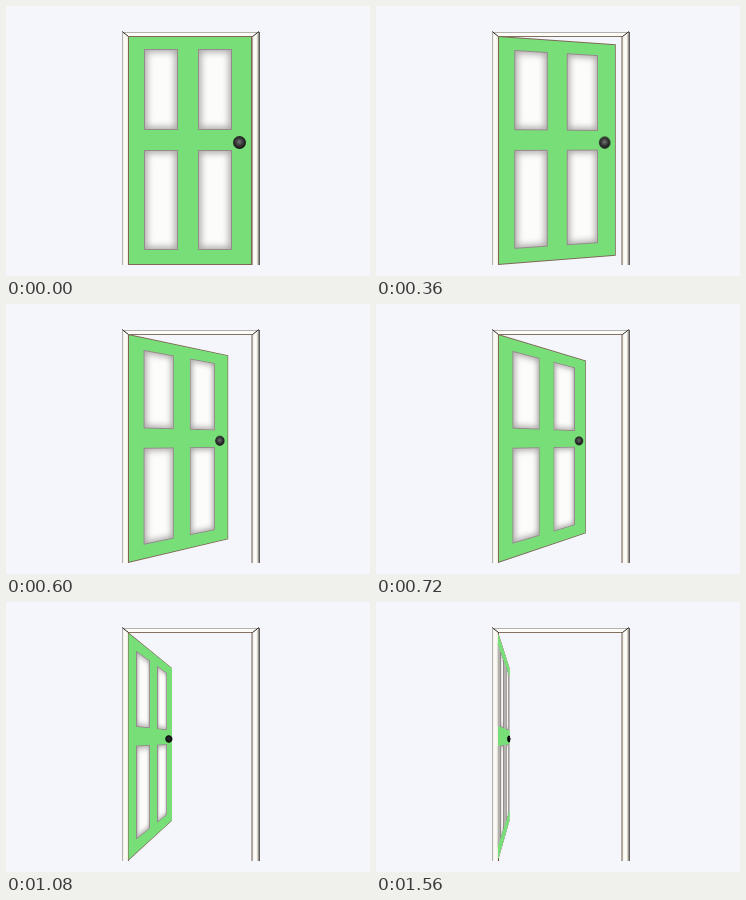
Write an HTML page without scripts that moves like this. It is 364x270 px and loops after 2.22 s.

```html
<!DOCTYPE html>
<html lang="en">
<head>
<meta charset="utf-8">
<title>Opening door</title>
<style>
  html, body {
    margin: 0;
    width: 100%;
    height: 100%;
    overflow: hidden;
    background: #f4f6fb;
  }

  .stage {
    position: relative;
    width: 364px;
    height: 270px;
    overflow: hidden;
    perspective: 239px;
    perspective-origin: 184px 138px;
  }

  .frame { position: absolute; inset: 0; }

  .door, .panel, .knob {
    position: absolute;
    box-sizing: border-box;
    animation: 2220ms infinite;
  }

  .door {
    left: 122px;
    top: 30px;
    width: 123.5px;
    height: 229px;
    background: #78de78;
    border: 1px solid #7d6656;
    transform-origin: 0 50%;
    animation-name: swing;
    animation-timing-function: steps(2);
  }

  .panel {
    --edge: #a5a3a0;
    width: 34px;
    background: #fcfdfb;
    border: 1px solid #94898b;
    animation-name: flatten;
    animation-timing-function: steps(4);
  }
  .left { left: 15px; }
  .right { left: 69px; }
  .upper { top: 12px; height: 81px; }
  .lower { top: 113px; height: 100px; }

  .knob {
    left: 104px;
    top: 99px;
    width: 13px;
    height: 13px;
    border-radius: 50%;
    background: radial-gradient(circle at 48% 45%, #777 0, #444 30%, #1c1c1c 62%, #000);
    animation-name: bulge;
    animation-timing-function: steps(4);
  }

  /* One pose every 120 ms, each split in two held steps. */
  @keyframes swing {
    0%      { transform: rotateY(0deg); }
    5.405%  { transform: rotateY(.8deg); }
    10.811% { transform: rotateY(2.7deg); }
    16.216% { transform: rotateY(9.2deg); }
    21.622% { transform: rotateY(17.5deg); }
    27.027% { transform: rotateY(28deg); }
    32.432% { transform: rotateY(39deg); }
    37.838% { transform: rotateY(51deg); }
    43.243% { transform: rotateY(63deg); }
    48.649% { transform: rotateY(73.6deg); }
    54.054% { transform: rotateY(83.5deg); }
    59.459% { transform: rotateY(90.8deg); }
    64.865% { transform: rotateY(94.5deg); }
    70.27%, 100% { transform: rotateY(96.5deg); }
  }

  /* Panel edges keep their visible weight as the door turns edge-on. */
  @keyframes flatten {
    0%, 32.432% {
      border-inline-width: 1px;
      box-shadow: inset 0 0 7px 2px #aaa5a6, 0 0 var(--edge), 0 0 var(--edge);
    }
    48.649% {
      border-inline-width: 2px;
      box-shadow: inset 0 0 7px 2px #aaa5a6, 0 0 var(--edge), 0 0 var(--edge);
    }
    59.459% {
      border-inline-width: 6px;
      box-shadow: inset 0 0 10px 8px #b8b4b6, 4px 0 var(--edge), -4px 0 var(--edge);
    }
    70.27%, 100% {
      border-inline-width: 8px;
      box-shadow: inset 0 0 6px 2px #c4c1c0, 18px 0 #b4b2ae, -18px 0 #b4b2ae;
    }
  }

  /* The knob stands out from the door, so it narrows less than the door does. */
  @keyframes bulge {
    0%, 21.622% { transform: scale(1); filter: brightness(1); }
    32.432% { transform: scale(1.15, .9); filter: brightness(.9); }
    48.649% { transform: scale(2.2, .85); filter: brightness(.4); }
    59.459% { transform: scale(3.3, .8); filter: brightness(.2); }
    70.27%, 100% { transform: scale(4, .75); filter: brightness(.2); }
  }
</style>
</head>
<body>
<div class="stage">
  <svg class="frame" width="364" height="270" viewBox="0 0 364 270">
    <defs>
      <linearGradient id="post">
        <stop offset="0" stop-color="#ece9e2"/>
        <stop offset=".45" stop-color="#fffffd"/>
        <stop offset="1" stop-color="#ece8de"/>
      </linearGradient>
    </defs>
    <path d="M116.5 26L122.5 30.5V259H116.5Z" fill="url(#post)"/>
    <path d="M253 26L246 30.5V259H253Z" fill="url(#post)"/>
    <path d="M116 26.5H253L246.5 30.5H122Z" fill="#fdfcf8"/>
    <g fill="none">
      <path d="M116.5 27V259M117 26.5H253" stroke="#b5b1ac"/>
      <path d="M122 30.5H246.5" stroke="#85715f"/>
      <path d="M122.5 30V259" stroke="#51443c"/>
      <path d="M246 30V259" stroke="#6e5c50"/>
      <path d="M252 28V259" stroke="#b5aea4"/>
      <path d="M253.2 26V259" stroke="#1d1a18"/>
      <path d="M116 25.5L122.5 30.5M253 25.5L246.5 30.5" stroke="#2c2825"/>
    </g>
  </svg>
  <div class="door">
    <div class="panel left upper"></div>
    <div class="panel right upper"></div>
    <div class="panel left lower"></div>
    <div class="panel right lower"></div>
    <div class="knob"></div>
  </div>
</div>
</body>
</html>
```
